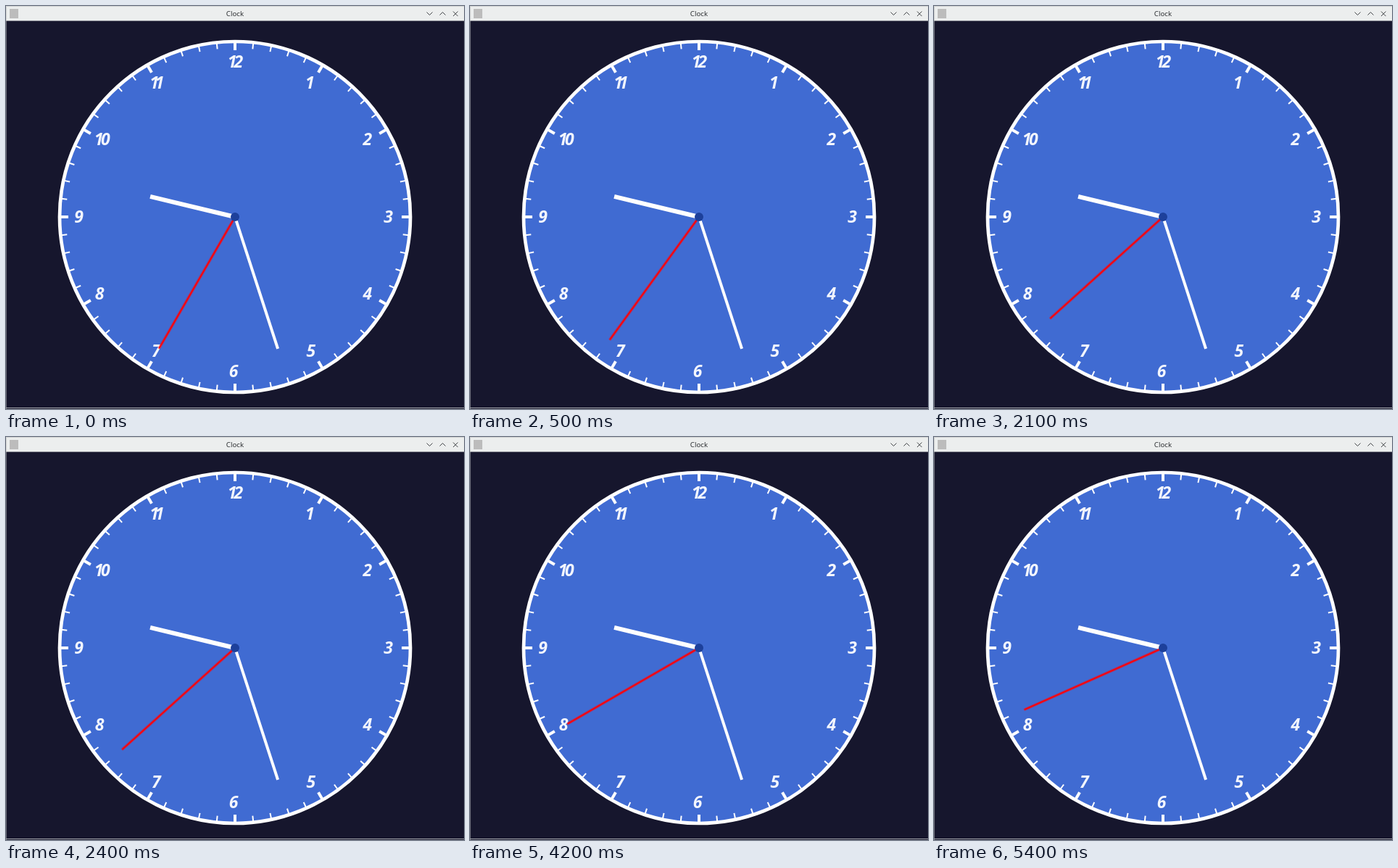
Animation of 632x556 px, one loop 6000 ms. Source, as an HTML page:

```html
<!DOCTYPE html>
<html lang="en">
<head>
<meta charset="utf-8">
<title>Clock</title>
<style>
  html, body { margin: 0; width: 100%; height: 100%; overflow: hidden; background: #16162d; }
  svg { display: block; width: 632px; height: 556px; }
  .title { font: 9.7px "Noto Sans", sans-serif; fill: #303336; text-anchor: middle; }
  .numeral { font: italic 700 23px "Noto Sans", sans-serif; fill: #f3f6fd; text-anchor: middle; }
  .buttons { fill: none; stroke: #404346; stroke-width: 1; }
</style>
</head>
<body>
<svg viewBox="0 0 632 556">
  <rect width="632" height="556" fill="#16162d"/>
  <rect width="632" height="20.5" fill="#eceeee"/>
  <path d="M0 .5H632M.5 0V556" stroke="#b5b8ba" opacity=".5"/>
  <path d="M0 554.5H632" stroke="#a5a8ad"/>
  <rect x="5" y="4" width="12" height="13" fill="#bcbcbc"/>
  <text class="title" x="316" y="14">Clock</text>
  <path class="buttons" d="M580.5 8.5l4 4 4-4M598.5 12.5l4-4 4 4M617 7.5l6.5 6.5m0-6.5l-6.5 6.5"/>

  <circle cx="316" cy="291" r="242" fill="#406bd2" stroke="#fff" stroke-width="4.7"/>
  <g id="ticks" transform="translate(316 291)" stroke="#fff"></g>
  <g id="numerals"></g>
  <g transform="translate(316 291)">
    <path d="M0 0V-120.3" transform="rotate(283.5)" stroke="#fff" stroke-width="6"/>
    <path d="M0 0V-191.3" transform="rotate(162)" stroke="#fff" stroke-width="4"/>
    <path id="second" d="M0 0V-209.7" stroke="#fe0008" stroke-width="2.8"/>
    <circle r="6" fill="#1d409b"/>
  </g>
</svg>
<script>
  const add = (parent, tag, attrs, text = '') => {
    const node = document.createElementNS('http://www.w3.org/2000/svg', tag);
    for (const key in attrs) node.setAttribute(key, attrs[key]);
    node.textContent = text;
    document.getElementById(parent).append(node);
  };

  for (let minute = 0; minute < 60; minute++) {
    const major = minute % 5 === 0;
    add('ticks', 'path', {
      d: `M0 -241V${major ? -230 : -233}`,
      transform: `rotate(${minute * 6})`,
      'stroke-width': major ? 4 : 2
    });
  }

  // Horizontal offset and pair spacing for numerals containing a narrow 1.
  const nudge = { 1: -1.5, 10: 3.6, 11: 1, 12: 2.4 };
  const kern = { 10: -3.5, 11: -5.5, 12: -4 };
  for (let hour = 1; hour <= 12; hour++) {
    const angle = hour * Math.PI / 6;
    add('numerals', 'text', {
      class: 'numeral',
      x: 314 + 213.5 * Math.sin(angle) + (nudge[hour] || 0),
      y: 298.7 - 213.5 * Math.cos(angle),
      dx: `0 ${kern[hour] || 0}`
    }, hour);
  }

  const duration = 6000;
  const steps = [[0, 35], [100, 36], [1300, 37], [2100, 38], [3300, 39], [4200, 40], [5300, 41], [6000, 41]];
  document.getElementById('second').animate(
    steps.map(([time, second]) => ({
      offset: time / duration,
      transform: `rotate(${second * 6}deg)`,
      easing: 'step-end'
    })),
    { duration, iterations: Infinity }
  );
</script>
</body>
</html>
```
